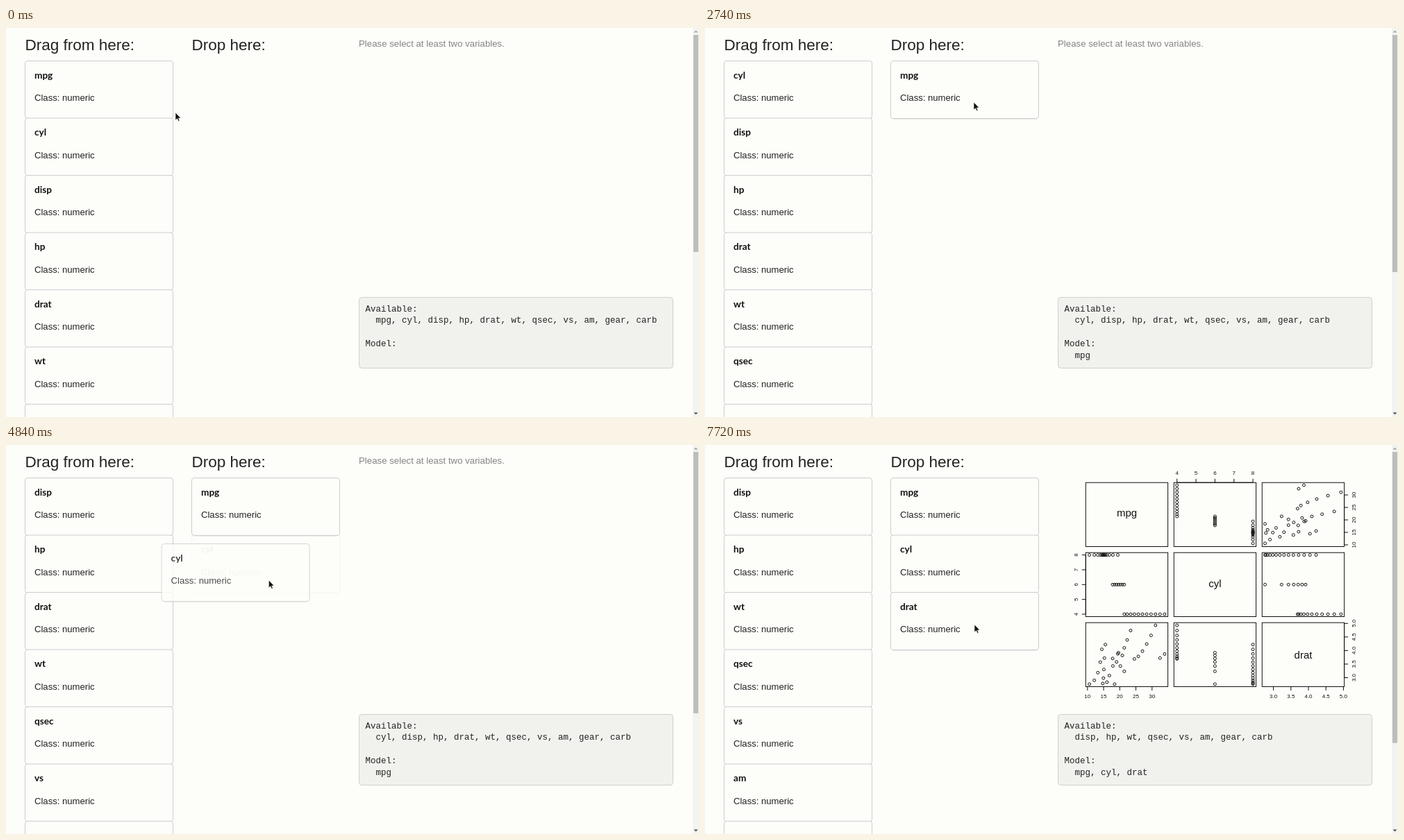
These frames come from a looping animation (998 by 561 pixels, 8000 ms). An HTML page:

```html
<!DOCTYPE html>
<html lang="en">
<head>
<meta charset="utf-8">
<title>Drag variables into a model</title>
<style>
html, body { margin: 0; width: 100%; height: 100%; overflow: hidden; background: #fdfdfa; }
svg { display: block; width: 998px; height: 561px; font-family: "Liberation Sans", Arial, sans-serif; }
text { fill: #222; }
.title { font-size: 22.5px; }
.hint { font-size: 13.25px; fill: #858585; }
.card rect { fill: #fdfdfa; stroke: #cdcdd0; }
.card .name { font: 700 13.6px Lato, sans-serif; fill: #111; }
.card .kind { font-size: 13.1px; }
.mono { font: 12.5px "Liberation Mono", "Courier New", monospace; }
.plot { fill: none; stroke: #111; stroke-width: 1; }
.plot text { fill: #111; stroke: none; text-anchor: middle; }
</style>
</head>
<body>
<svg id="stage" viewBox="0 0 998 561"></svg>
<script>
const LOOP = 8000;
const LEAD = 55;     // the dragged card runs ahead of the drawn pointer
const LATENCY = 70;  // from drop to new output
const TOP = 47.5, LEFT = 27.5, RIGHT = 267.5, PITCH = 82.5;

const names = ['mpg', 'cyl', 'disp', 'hp', 'drat', 'wt', 'qsec', 'vs', 'am', 'gear', 'carb'];

const drags = [
  { name: 'mpg', start: 1780, drop: 2670 },
  { name: 'cyl', start: 3970, drop: 5210 },
  { name: 'drat', start: 6480, drop: 7650 }
];

// Pointer moves; bow lifts the middle of the way off the straight line.
const rest = [244, 122];
const moves = [
  { from: 1090, to: 1490, end: [150, 100], bow: 16 },
  { from: 1655, to: 2520, end: [387, 107], bow: 8 },
  { from: 3100, to: 3710, end: [184, 100], bow: 0 },
  { from: 4053, to: 4933, end: [381, 195], bow: 32 },
  { from: 5530, to: 6140, end: [163, 249], bow: 0 },
  { from: 6480, to: 7480, end: [388, 259], bow: 0 }
];

const clamp = k => Math.min(1, Math.max(0, k));
const ease = k => k * k / (k * k + (1 - k) * (1 - k));
const linear = (v0, p0, slope) => v => p0 + (v - v0) * slope;
const seq = (first, step) => [0, 1, 2, 3, 4].map(i => first + i * step);

function pointer(t) {
  let [x, y] = rest;
  for (const { from, to, end, bow } of moves) {
    const e = ease(clamp((t - from) / (to - from)));
    x += (end[0] - x) * e;
    y += (end[1] - y) * e + bow * Math.sin(Math.PI * e);
  }
  return [x, y];
}

// Each cylinder group spreads evenly in mpg; a stepped order scatters drat.
const groups = [
  { cyl: 4, n: 11, first: 5, step: 2, mpg: u => 21.4 + 12.5 * u ** 1.15, drat: u => 3.69 + 1.24 * u ** 1.6 },
  { cyl: 6, n: 7, first: 4, step: 3, mpg: u => 17.8 + 3.6 * u, drat: u => 2.76 + 1.16 * u ** 0.5 },
  { cyl: 8, n: 14, first: 0, step: 3, mpg: u => 15 + 0.9 * (2 * u - 1) + 3.5 * (2 * u - 1) ** 3, drat: u => 2.76 + 1.46 * u ** 1.6 }
];
const cars = groups.flatMap(({ cyl, n, first, step, mpg, drat }) =>
  Array.from({ length: n }, (_, i) => ({
    cyl, mpg: mpg(i / (n - 1)), drat: drat((first + i * step) % n / (n - 1))
  })));
const ticks = { mpg: seq(10, 5), cyl: seq(4, 1), drat: seq(3, 0.5) };

const stage = document.getElementById('stage');

function el(tag, attrs, parent = stage, text) {
  const node = document.createElementNS('http://www.w3.org/2000/svg', tag);
  for (const key in attrs) node.setAttribute(key, attrs[key]);
  if (text !== undefined) node.textContent = text;
  return parent.appendChild(node);
}
const label = (parent, x, y, text, cls) => el('text', { x, y, class: cls }, parent, text);
const show = (node, on) => node.setAttribute('visibility', on ? 'visible' : 'hidden');
const move = (node, x, y) => node.setAttribute('transform', `translate(${x} ${y})`);

function makeCard(name) {
  const g = el('g', { class: 'card' });
  el('path', { d: 'M3 84H210', stroke: '#000', 'stroke-opacity': 0.08 }, g);
  el('rect', { width: 213, height: 83, rx: 3.5 }, g);
  label(g, 13.5, 25, name, 'name');
  label(g, 13.5, 57.8, 'Class: numeric', 'kind');
  return g;
}

// Text centred on (x, y), turned upright when asked.
function mark(g, x, y, text, size, turned) {
  const attrs = { x, y: y + size * 0.36, 'font-size': size };
  if (turned) attrs.transform = `rotate(-90 ${x} ${y})`;
  el('text', attrs, g, text);
}

function points(g, xVar, yVar, fx, fy, r) {
  for (const car of cars) el('circle', { cx: fx(car[xVar]), cy: fy(car[yVar]), r }, g);
}

// side: -1 for top or left, 1 for bottom or right
function axis(g, name, scale, edge, side, vertical, { tick, gap, size }) {
  const spots = ticks[name].map(scale), out = edge + side * tick, at = edge + side * gap;
  const digits = name === 'drat' ? 1 : 0;
  let d = vertical ? `M${edge} ${spots[0]}V${spots[4]}` : `M${spots[0]} ${edge}H${spots[4]}`;
  spots.forEach((p, i) => {
    d += vertical ? `M${edge} ${p}H${out}` : `M${p} ${edge}V${out}`;
    mark(g, vertical ? at : p, vertical ? p : at, ticks[name][i].toFixed(digits), size, vertical);
  });
  el('path', { d }, g);
}

function makeScatter() {
  const g = el('g', { class: 'plot' });
  const fx = linear(10, 571.5, 14.51), fy = linear(4, 310.2, -57.9);
  const style = { tick: 7, gap: 20, size: 11.3 };
  el('rect', { x: 563.5, y: 69.5, width: 368.5, height: 250 }, g);
  axis(g, 'mpg', fx, 320, 1, false, style);
  axis(g, 'cyl', fy, 563.5, -1, true, style);
  points(g, 'mpg', 'cyl', fx, fy, 2.9);
  mark(g, 748, 367.4, 'mpg', 11.3);
  mark(g, 517.5, 194.5, 'cyl', 11.3, true);
  return g;
}

function makePairs() {
  const g = el('g', { class: 'plot' });
  const vars = ['mpg', 'cyl', 'drat'];
  const fx = [linear(10, 550.8, 4.65), linear(4, 679.7, 27.35), linear(3, 818.6, 50.4)];
  const fy = [linear(10, 144, -3.6), linear(4, 244, -21.35), linear(3, 335.5, -39.1)];
  const style = { tick: 5.5, gap: 14, size: 8 };
  const [left, top, right, bottom] = [548.3, 54.2, 920.6, 348.5];
  vars.forEach((row, j) => vars.forEach((col, i) => {
    const x = left + 127 * i, y = top + 101 * j;
    el('rect', { x, y, width: 118.3, height: 92.3 }, g);
    if (i === j) mark(g, x + 59.2, y + 43 + 1.5 * i, row, 15);
    else points(g, col, row, fx[i], fy[j], 2);
  }));
  axis(g, 'cyl', fx[1], top, -1, false, style);
  axis(g, 'cyl', fy[1], left, -1, true, style);
  for (const i of [0, 2]) {
    axis(g, vars[i], fx[i], bottom, 1, false, style);
    axis(g, vars[i], fy[i], right, 1, true, style);
  }
  return g;
}

label(stage, LEFT, 32, 'Drag from here:', 'title');
label(stage, RIGHT, 32, 'Drop here:', 'title');
const hint = label(stage, 508, 27, 'Please select at least two variables.', 'hint');

el('rect', { x: 508.5, y: 388.5, width: 452, height: 102, rx: 4, fill: '#f1f1ee', stroke: '#cfcfcc' });
const line = (i, x, text) => label(stage, x, 408.5 + 16.875 * i, text, 'mono');
line(0, 517.5, 'Available:');
line(3, 517.5, 'Model:');
const available = line(1, 532.5, ''), model = line(4, 532.5, '');
const scatter = makeScatter(), pairs = makePairs();

const cards = names.map(makeCard);
const ghost = makeCard('');
ghost.setAttribute('opacity', 0.8);
const ghostName = ghost.querySelector('.name');

el('rect', { x: 989, width: 9, height: 561, fill: '#f3f3f1' });
const thumb = el('rect', { x: 990, y: 10, width: 7, fill: '#bdbdbd' });
el('path', { d: 'M990.5 6.5L993.5 3.5L996.5 6.5Z', fill: '#a5a5a5' });
el('path', { d: 'M990.5 554.5L993.5 557.5L996.5 554.5Z', fill: '#505050' });

const arrow = el('path', {
  d: 'M0 0V11L2.6 8.7L4.3 12.4L6 11.6L4.4 8H7.8Z',
  fill: '#111', stroke: '#fff', 'stroke-width': 0.6
});
const hand = el('path', {
  d: 'M-4 4Q-3 2.8 -1 3.4L-1.4 1.4Q0 0 1 1.8Q2 1.2 3 2.4Q4.6 2.4 4.8 4.2V9H-1L-4 5.4Z',
  fill: '#111', stroke: '#fff', 'stroke-width': 0.5
});

function render(t) {
  const [dragX, dragY] = pointer(t + LEAD);
  const active = drags.find(d => t >= d.start && t < d.drop);
  const namesOf = test => drags.filter(test).map(d => d.name);
  const moved = namesOf(d => t >= d.drop || d === active && dragX > RIGHT);
  const used = namesOf(d => t >= d.drop + LATENCY);

  let row = 0;
  names.forEach((name, i) => {
    const slot = moved.indexOf(name), right = slot >= 0;
    move(cards[i], right ? RIGHT : LEFT, TOP + PITCH * (right ? slot : row++));
    cards[i].setAttribute('opacity', active && active.name === name ? 0.2 : 1);
  });

  show(ghost, active);
  if (active) {
    const [grabX, grabY] = pointer(active.start);
    const homeRow = names.indexOf(active.name) - drags.indexOf(active);
    ghostName.textContent = active.name;
    move(ghost, LEFT + dragX - grabX, TOP + PITCH * homeRow + dragY - grabY);
  }

  available.textContent = names.filter(n => !used.includes(n)).join(', ');
  model.textContent = used.join(', ');
  show(hint, used.length < 2);
  show(scatter, used.length === 2);
  show(pairs, used.length === 3);
  thumb.setAttribute('height', 304500 / (973 - PITCH * moved.length));

  const [x, y] = pointer(t), grip = !active && x < 240;
  move(arrow, x, y);
  move(hand, x, y);
  show(arrow, !grip);
  show(hand, grip);
}

const begin = performance.now();
function tick() {
  render((performance.now() - begin) % LOOP);
  requestAnimationFrame(tick);
}
tick();
</script>
</body>
</html>
```
